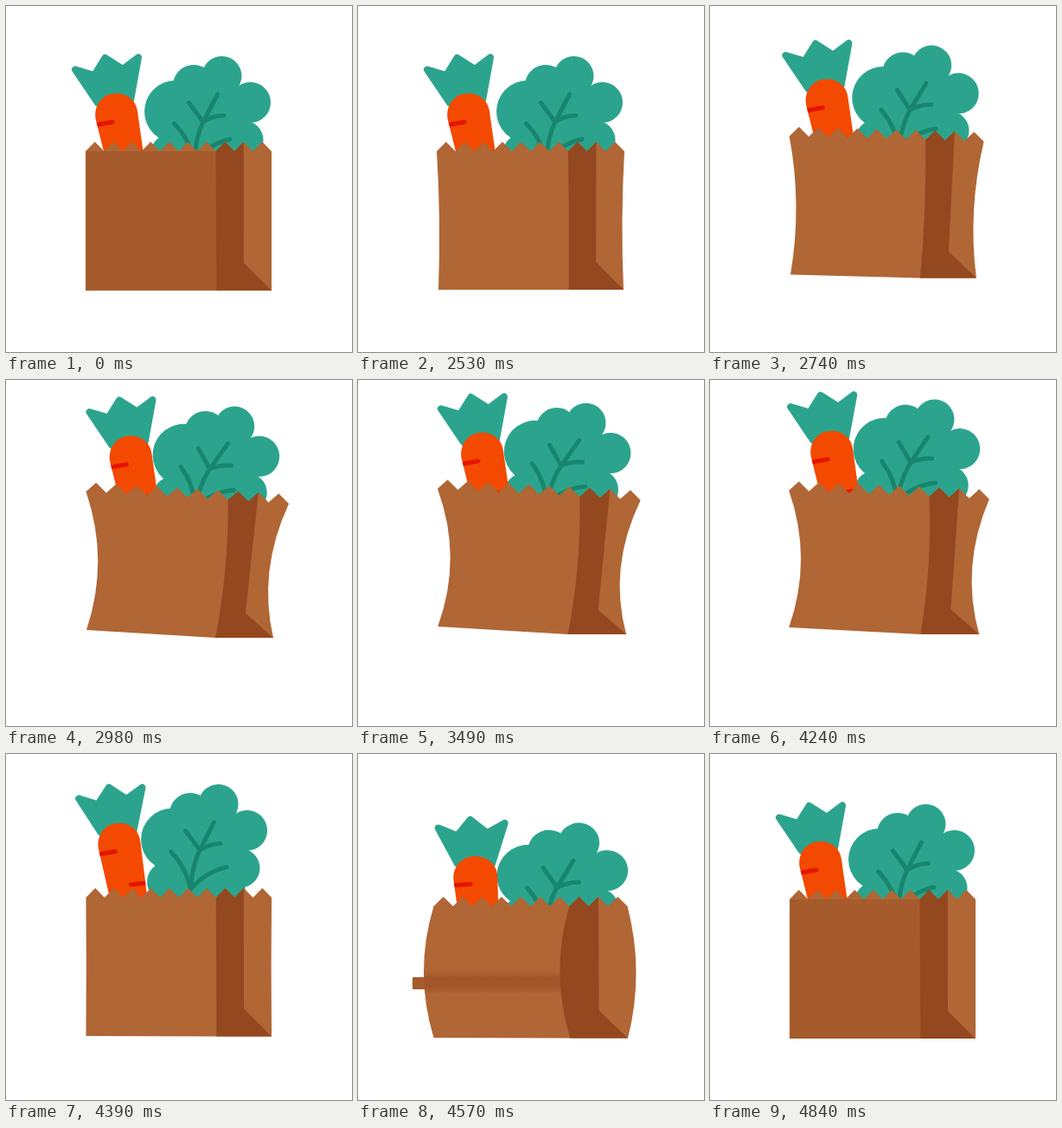
These frames come from a looping animation (400x400 px, 4870 ms). An HTML page:

```html
<!DOCTYPE html>
<html lang="en">
<head>
<meta charset="utf-8">
<title>Grocery bag</title>
<style>
  html, body { margin: 0; width: 100%; height: 100%; overflow: hidden; background: #fff; }
  svg { display: block; width: 100%; height: 100%; }
  .leaf { fill: #2ca48d; }
  .vein { fill: none; stroke: #17866c; stroke-width: 5; stroke-linecap: round; stroke-linejoin: round; }
  .mark { stroke: #e51400; stroke-width: 5; stroke-linecap: round; }
  .paper { fill: #b06635; }
  .front { fill: #a65b2c; }
  .fold { fill: #934820; }
</style>
</head>
<body>
<svg viewBox="0 0 400 400">
  <defs>
    <linearGradient id="soft" x2="0" y2="1">
      <stop offset="0" stop-color="#a0552a" stop-opacity="0"/>
      <stop offset=".35" stop-color="#a0552a"/>
      <stop offset=".65" stop-color="#a0552a"/>
      <stop offset="1" stop-color="#a0552a" stop-opacity="0"/>
    </linearGradient>
    <clipPath id="frontClip"><path id="clipShape"/></clipPath>
    <clipPath id="bodyClip"><use href="#body"/></clipPath>
  </defs>

  <g id="lettuce">
    <g class="leaf">
      <circle cx="196" cy="122" r="36"/>
      <circle cx="217" cy="92" r="24"/>
      <circle cx="249.500" cy="81" r="23"/>
      <circle cx="282.500" cy="111.500" r="23.500"/>
      <circle cx="275" cy="155" r="22.500"/>
      <circle cx="190" cy="171" r="23"/>
      <path d="M196 122L217 92L249 81L282 111L280 205H180V171Z"/>
    </g>
    <path class="vein" d="M217 180Q220 150 228 134L244.500 102M228 134L211.500 112M228 134Q239 127 252 126.500M194.500 136Q212 154 217 178M217 180Q235 159 259 154"/>
  </g>

  <g id="carrot">
    <path class="leaf" stroke="#2ca48d" stroke-width="8" stroke-linejoin="round"
      d="M80 73.500L102 80L114.500 60L135 73L153 59.500L144 109L126 125L106 112Z"/>
    <path id="body" fill="#f34900" d="M103.700 131C101 114 112 101 127.500 101C140 101 150.500 109 152 122L162 192Q148 206 121 200Z"/>
    <path class="mark" clip-path="url(#bodyClip)" d="M104 137.500L123 134M142 172L160 169.500"/>
  </g>

  <rect id="stub" class="front" x="63" y="258" width="16" height="14" rx="1"/>
  <path id="paper" class="paper"/>
  <rect id="band" x="70" y="250" width="180" height="28" fill="url(#soft)" clip-path="url(#frontClip)"/>
  <rect id="shade" class="front" x="92" y="168" width="152" height="161"/>
  <path id="fold" class="fold"/>
</svg>

<script>
const LOOP = 4870, START = 2530, END = 4840;
const $ = id => document.getElementById(id);

// bag: top-left, top-right, bottom-left, bottom-right, pinch
// carrot and lettuce: x, y, turn
const pose = (bag, carrot, lettuce) => [...bag, ...carrot, ...lettuce];
const still = [0, 0, 0];
const box = [92, 168, 307, 168, 92, 329, 307, 329, 0];
const rest = pose(box, still, still);
const tense = pose([91, 168, 308, 168, 93, 328, 307, 328, 2], still, still);
const lift = pose([92.5, 129, 327, 143, 93, 289, 309, 298, 13.5], [16.5, -36.5, 0], [9.5, -30.5, 8]);
const hang = pose([91, 120, 326, 132, 91, 278, 312, 287.5, 16.5], [15, -46.5, 0], [7.5, -41, 8]);
const land = pose([92.5, 166, 307, 166, 92.5, 326, 307, 326.5, 0.5], [3.2, -21.5, 1], [-4, -23.5, 0]);
const squash = pose([87.5, 176, 311.5, 176, 87.5, 328, 312, 328.5, -11.5], [8, 17, 6.5], [3, 20.5, 3]);
const bounce = pose(box, [0, -2, 0], [0, -2, 0]);

const smooth = u => (1 - Math.cos(Math.PI * u)) / 2;
const drift = u => 2 * u - 4 * u * u + 3 * u ** 3;
const drop = u => 1.25 * u ** 3 - 0.25 * u * u;
const out = u => Math.sin(u * Math.PI / 2);

// time, pose, easing on the way there
const keys = [
  [START, tense],
  [2980, lift, smooth],
  [4030, hang, drift],
  [4390, land, drop],
  [4570, squash, out],
  [4680, bounce, smooth],
  [END, rest, smooth]
];

function poseAt(t) {
  if (t < START || t >= END) return rest;
  const i = keys.findIndex(k => t < k[0]);
  const [t0, a] = keys[i - 1], [t1, b, ease] = keys[i];
  const p = ease((t - t0) / (t1 - t0));
  return a.map((v, n) => v + (b[n] - v) * p);
}

function place(id, x, y, turn, wide, cx, cy) {
  $(id).setAttribute('transform',
    `translate(${cx + x} ${cy + y}) scale(${wide} 1) rotate(${turn}) translate(${-cx} ${-cy})`);
}

// curved edge from a to b, bowed sideways at its middle
const bow = (a, b, by) => `Q${(a[0] + b[0]) / 2 + 2 * by} ${(a[1] + b[1]) / 2} ${b}`;

function draw(t) {
  const [ax, ay, bx, by, cx, cy, dx, dy, pinch, kx, ky, kr, lx, ly, lr] = poseAt(t);
  const idle = t < START || t >= END;
  const tilt = dy - cy;
  const bl = [cx, cy], br = [dx, dy];
  const crease = [cx + (dx - cx) * (0.704 - tilt * 0.0015), cy + tilt];
  const corner = [dx - (dx - cx) * 0.149, dy - 32 + tilt * 0.4];
  const teeth = Array.from({ length: 21 }, (_, i) =>
    [ax + (bx - ax) * i / 20, ay + (by - ay) * i / 20 - (i % 2) * 11]);
  const bend = pinch > 0 ? pinch * 0.3 : pinch;
  const wide = 1 + Math.max(0, -pinch) * 0.0032;
  const left = bow(bl, teeth[0], pinch) + 'Z';

  $('paper').setAttribute('d',
    `M${teeth.join('L')}${bow(teeth[20], br, pinch > 0 ? -pinch : -pinch * 0.85)}L${crease}L${bl}${left}`);
  $('clipShape').setAttribute('d',
    `M${teeth.slice(0, 15).join('L')}${bow(teeth[14], crease, bend)}L${bl}${left}`);
  $('fold').setAttribute('d',
    `M${teeth.slice(14, 18).join('L')}L${corner}L${br}L${crease}${bow(crease, teeth[14], bend)}Z`);

  place('carrot', kx, ky, kr, wide, 127, 126);
  place('lettuce', lx, ly, lr, wide, 230, 120);

  const creased = t >= 4540 && t < 4600;
  $('shade').style.display = idle ? '' : 'none';
  $('stub').style.display = $('band').style.display = creased ? '' : 'none';
}

const begin = performance.now();
function tick() {
  draw((performance.now() - begin) % LOOP);
  requestAnimationFrame(tick);
}
tick();
</script>
</body>
</html>
```
